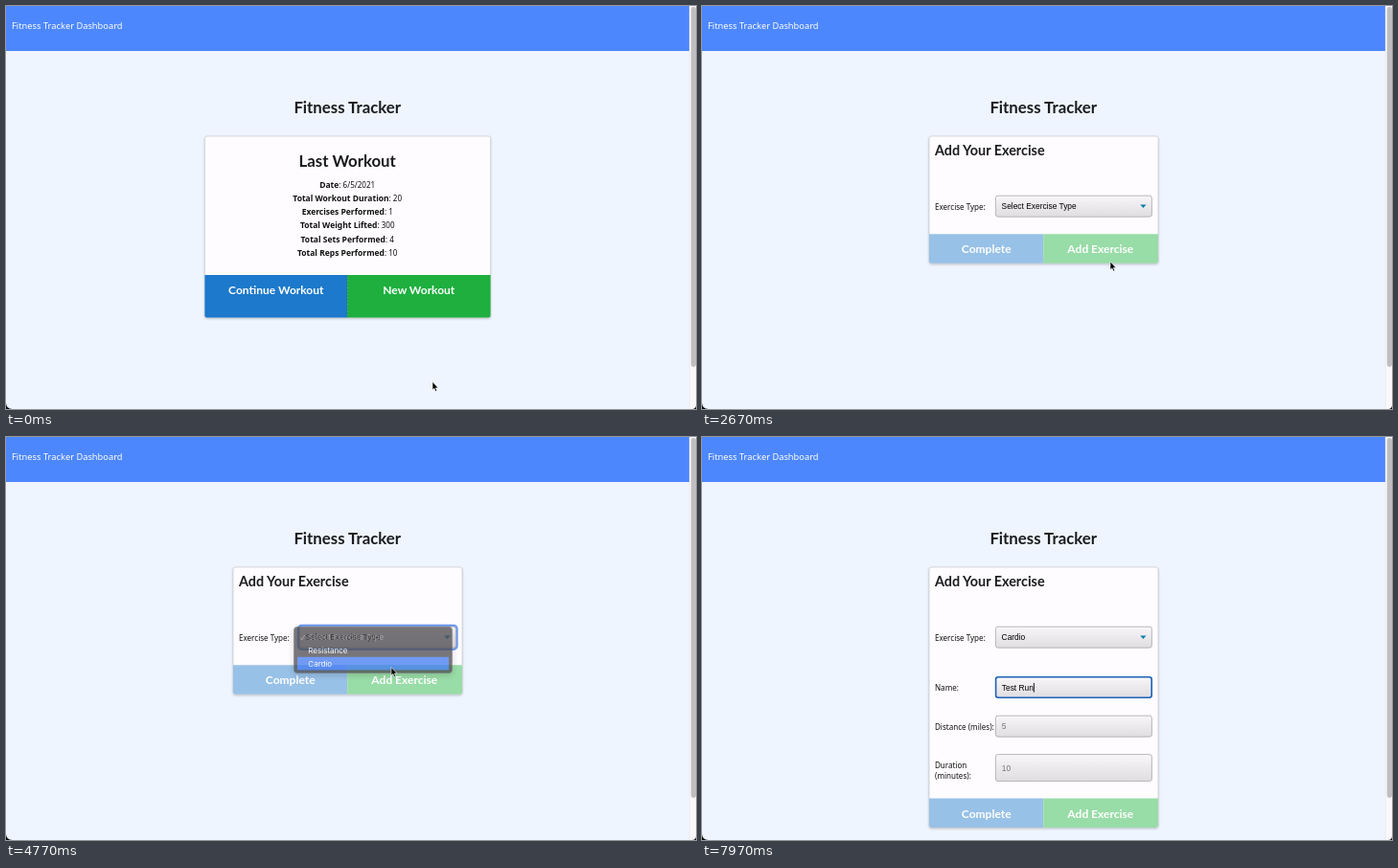
Recreate the animation shown at these times as an HTML page. Size 720 px wide and 421 px high, loop 8 s.

```html
<!DOCTYPE html>
<html lang="en">
<head>
<meta charset="utf-8">
<title>Fitness Tracker</title>
<style>
  html, body { margin: 0; width: 100%; height: 100%; overflow: hidden; background: #eff5fe; }
  svg { display: block; width: 100vw; height: 100vh; }
  text { font: 8.05px "Noto Sans", "Open Sans", sans-serif; fill: #111; white-space: pre; }
  .brand { font-size: 9.3px; fill: #fff; }
  .bold { font-weight: 700; font-size: 8.5px; }
  .mid { text-anchor: middle; }
  .head { font: 700 16.8px Lato, sans-serif; fill: #1b1c1d; }
  .sub { font-size: 14.4px; }
  .btn { font: 700 12px Lato, sans-serif; fill: #fff; text-anchor: middle; }
  .field { font: 8.4px "Liberation Sans", Arial, sans-serif; fill: #000; }
  .hint { fill: #757575; }
  .menu text { font: 8px Inter, sans-serif; fill: #fff; }
  .menu .off { fill: #918f92; }
  .status { font: 7.2px Inter, sans-serif; fill: #dcdde0; }
  .card { fill: #fefcfe; stroke: #d0d1d6; stroke-width: .8; filter: drop-shadow(0 1px 1px #0003); }
  .box { fill: url(#metal); stroke: #a9a8ab; stroke-width: .8; }
</style>
</head>
<body>
<svg viewBox="0 0 720 421" preserveAspectRatio="none">
  <defs>
    <linearGradient id="metal" x2="0" y2="1">
      <stop stop-color="#f8f6f8"/><stop offset="1" stop-color="#dfdde0"/>
    </linearGradient>
  </defs>
  <rect width="720" height="421" fill="#eff5fe"/>
  <rect width="713" height="47" fill="#4d87fe"/>
  <text class="brand" x="6" y="24">Fitness Tracker Dashboard</text>
  <rect x="713" width="7" height="421" fill="#faf8fa"/>
  <path d="M713.3 0V421" stroke="#e6e4e7" stroke-width=".6"/>
  <rect x="714.8" y="1" width="5.2" height="376" rx="2.4" fill="#c1bec1"/>
  <text class="head mid" x="356.2" y="111.5">Fitness Tracker</text>

  <g id="dashboard">
    <rect class="card" x="207.4" y="136" width="298.2" height="189.6" rx="2.4"/>
    <text class="head mid" x="356.2" y="168">Last Workout</text>
    <g id="stats"></g>
    <path d="M207.4 281H356.2V325.6H209.8Q207.4 325.6 207.4 323.2Z" fill="#1c79cb"/>
    <path id="newButton" d="M356.2 281H505.6V323.2Q505.6 325.6 503.2 325.6H356.2Z"/>
    <path d="M356.2 281V325.6" stroke="#16803f" stroke-width=".8" stroke-dasharray="2 1.5"/>
    <text class="btn" x="281.8" y="301.3">Continue Workout</text>
    <text class="btn" x="430.8" y="301.3">New Workout</text>
  </g>

  <g id="form">
    <rect id="formCard" class="card" x="237" y="136" width="239" rx="2.4"/>
    <text class="head sub" x="243" y="156.3">Add Your Exercise</text>
    <text x="243" y="213">Exercise Type:</text>
    <rect id="ring" x="305" y="196.9" width="165.5" height="24.8" rx="3.5" fill="none" stroke="#6c9bf3" stroke-width="2.4"/>
    <rect class="box" x="306.4" y="198.2" width="163" height="22" rx="2.5"/>
    <text id="choice" class="field" x="312.6" y="212.3"></text>
    <path d="M457.3 207.6H463.5L460.4 211Z" fill="#087fac"/>
    <g id="cardio">
      <text x="243" y="265">Name:</text>
      <rect id="nameBox" class="box" x="306.6" y="250.7" width="162.6" height="21.6" rx="2.5"/>
      <text id="name" class="field" x="312.8" y="264.6"></text>
      <rect id="caret" y="257" width=".9" height="9.6" fill="#000"/>
      <text x="243" y="305.5">Distance (miles):</text>
      <rect class="box" x="306.4" y="291.2" width="163" height="22" rx="2.5"/>
      <text class="field hint" x="312.8" y="305.3">5</text>
      <text x="243" y="346">Duration</text>
      <text x="243" y="357">(minutes):</text>
      <rect class="box" x="306.4" y="331.6" width="163" height="28" rx="2.5"/>
      <text class="field hint" x="312.8" y="348.6">10</text>
    </g>
    <g id="actions">
      <path d="M237 0H356.2V30.6H239.4Q237 30.6 237 28.2Z" fill="#98c1e7"/>
      <path d="M356.2 0H476V28.2Q476 30.6 473.6 30.6H356.2Z" fill="#98dca7"/>
      <text class="btn" x="296.7" y="20.2">Complete</text>
      <text class="btn" x="415.8" y="20.2">Add Exercise</text>
    </g>
    <g id="menu" class="menu">
      <rect x="300.3" y="198.3" width="165.4" height="48.4" rx="4" fill="#4e4c50" stroke="#77757a" stroke-width=".6" style="filter:drop-shadow(0 2px 3px #0003)"/>
      <rect id="highlight" x="304" width="158" height="13.6" fill="#437bf2"/>
      <path d="M307 209.8L308.7 212L311.6 207" fill="none" stroke="#918f92"/>
      <text class="off" x="315.3" y="212.2">Select Exercise Type</text>
      <text x="315.3" y="226">Resistance</text>
      <text x="315.3" y="239.6">Cardio</text>
    </g>
  </g>

  <path d="M0 421V414.5Q0 421 6.5 421ZM720 421V417Q720 421 716 421Z" fill="#000"/>
  <g id="status">
    <path d="M0 409H207.5Q210 409 210 411.5V421H0Z" fill="#303236"/>
    <text class="status" x="3" y="417.3">https://mirotandel-workout-tracker.mandovia.test/exercise</text>
  </g>

  <g id="pointer">
    <path id="arrow" d="M0 0V8.6L1.9 6.9L3.3 10.1L4.7 9.5L3.4 6.4H6Z" fill="#000" stroke="#fff" stroke-width=".6"/>
    <path id="hand" d="M-.9 .6Q0-.6 .9 .6V3.4Q1.7 2.9 2.3 3.7Q3.1 3.2 3.6 4.1Q4.7 3.9 4.7 5V7.2L3.8 10H-.8L-3.3 6.6Q-3.7 5.3-2.4 5.4L-.9 6.6Z" fill="#fff" stroke="#000" stroke-width=".7"/>
    <path id="beam" d="M-2-4.4Q0-4.4 0-3.2Q0-4.4 2-4.4M0-3.4V3.8M-2 4.8Q0 4.8 0 3.6Q0 4.8 2 4.8M-1.2 1.6H1.2" fill="none" stroke="#222" stroke-width=".9"/>
  </g>
</svg>

<script>
const LOOP = 8000;
const HOVER = 1640, NEW_PAGE = 2330;
const OPEN = 3450, PICK = 4720, CLOSED = 4930;
const FOCUS = 5600, TYPING = 6600, KEY_GAP = 160;
const TYPED = "Test Run";

// Pointer positions: time, x, y
const PATH = [
  [0, 445, 392.5], [200, 445, 392.5], [820, 437, 255], [1300, 437, 255], [1700, 430, 295.5],
  [2500, 429, 295.5], [2670, 426, 267], [3100, 427, 212], [3600, 427, 212], [4100, 428, 227.5],
  [4300, 427, 228], [4620, 402, 240.5], [4960, 402, 240.5], [5500, 362, 267.5], [LOOP, 362, 267.5]
];

const el = {};
for (const node of document.querySelectorAll("[id]")) el[node.id] = node;
const set = (id, attrs) => { for (const key in attrs) el[id].setAttribute(key, attrs[key]); };
const show = (id, on) => { el[id].style.display = on ? "" : "none"; };

el.stats.innerHTML = [
  ["Date", "6/5/2021"], ["Total Workout Duration", 20], ["Exercises Performed", 1],
  ["Total Weight Lifted", 300], ["Total Sets Performed", 4], ["Total Reps Performed", 10]
].map(([label, value], i) =>
  `<text class="mid" x="356.2" y="${189.6 + i * 14.25}"><tspan class="bold">${label}</tspan>: ${value}</text>`
).join("");

function pointerAt(t) {
  const i = PATH.findIndex(p => p[0] > t);
  const [t0, x0, y0] = PATH[i - 1], [t1, x1, y1] = PATH[i];
  const u = (t - t0) / (t1 - t0), e = u * u * (3 - 2 * u);
  return [x0 + (x1 - x0) * e, y0 + (y1 - y0) * e];
}

function draw(t) {
  const onForm = t >= NEW_PAGE, expanded = t >= CLOSED;
  const focused = t >= FOCUS, hover = t >= HOVER && !onForm;
  const [x, y] = pointerAt(t);

  show("dashboard", !onForm);
  show("form", onForm);
  set("newButton", { fill: hover ? "#198f35" : "#1eaf3f" });
  show("status", t >= HOVER + 90 && !onForm);

  set("formCard", { height: expanded ? 272 : 132.8 });
  set("actions", { transform: `translate(0 ${expanded ? 377.4 : 238.2})` });
  show("cardio", expanded);
  show("ring", t >= OPEN && !focused);
  el.choice.textContent = expanded ? "Cardio" : "Select Exercise Type";

  show("menu", t >= OPEN && !expanded);
  set("menu", { opacity: Math.min(1, Math.max(0, (CLOSED - t) / (CLOSED - PICK))) });
  show("highlight", y > 216);
  set("highlight", { y: y < 230 ? 216.2 : 229.8 });

  const count = t < TYPING ? 0 : Math.min(TYPED.length, 1 + Math.floor((t - TYPING) / KEY_GAP));
  el.name.textContent = count ? TYPED.slice(0, count) : "Running";
  el.name.classList.toggle("hint", !count);
  el.nameBox.style.stroke = focused ? "#1c62b9" : "";
  el.nameBox.style.strokeWidth = focused ? 1.6 : "";
  show("caret", focused && (count || (t - FOCUS) % 1000 < 500));
  set("caret", { x: 312.8 + (count && expanded ? el.name.getComputedTextLength() : 0) });

  const overField = expanded && y > 250;
  show("pointer", !count);
  set("pointer", { transform: `translate(${x} ${y})` });
  show("hand", hover);
  show("beam", overField);
  show("arrow", !hover && !overField);
}

function tick() {
  draw(performance.now() % LOOP);
  requestAnimationFrame(tick);
}
tick();
</script>
</body>
</html>
```
